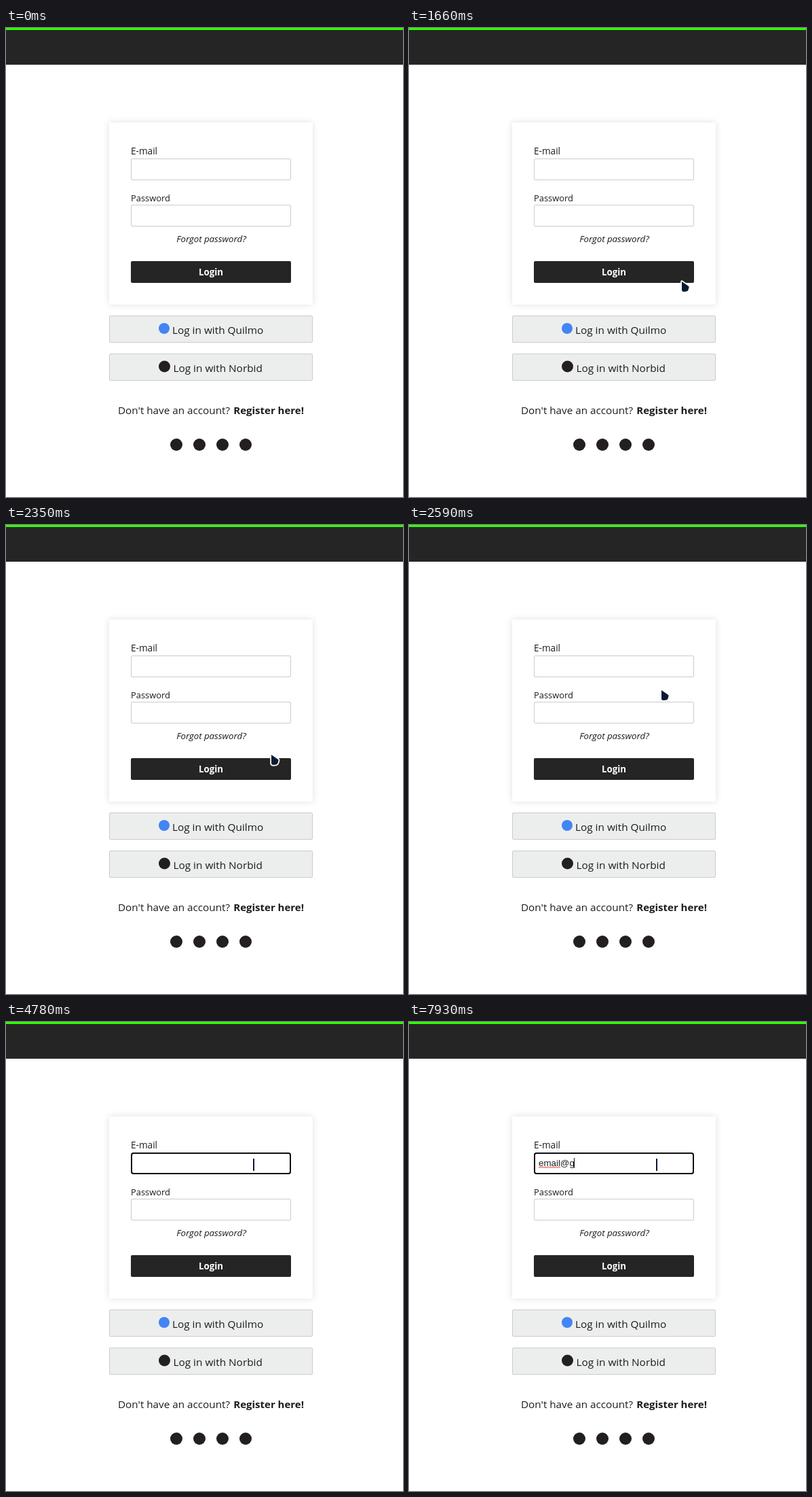
Recreate the animation shown at these times as an HTML page. Size 585 by 690 pixels, loop 8000 ms.

```html
<!DOCTYPE html>
<html lang="en">
<head>
<meta charset="utf-8">
<title>Login form</title>
<style>
html, body { margin: 0; width: 100%; height: 100%; overflow: hidden; background: #fff; }
svg { display: block; width: 585px; height: 690px; }
text { font-family: "Open Sans", "Noto Sans", sans-serif; fill: #1c1c1c; white-space: pre; }
#typed { font: 13.333px "Liberation Sans", Arial, sans-serif; }
.dark { fill: #252525; }
.field { fill: #fff; stroke: #ccc; }
.option { fill: #eceeee; stroke: #ccc; }
.icon { fill: #231f20; }
.card { filter: drop-shadow(0 0 5px rgba(0, 0, 0, .13)); }
</style>
</head>
<body>
<svg viewBox="0 0 585 690" xmlns="http://www.w3.org/2000/svg">
  <rect width="585" height="690" fill="#fff"/>
  <rect class="dark" width="585" height="54"/>
  <rect width="585" height="3" fill="#2bff00"/>

  <rect class="card" x="152" y="139" width="300" height="268" rx="2" fill="#fff"/>
  <text x="184" y="186" font-size="13.6">E-mail</text>
  <rect class="field" x="184.5" y="192.5" width="235" height="31" rx="1.5"/>
  <rect id="focus" x="185" y="193" width="234" height="30" rx="3" fill="#fff" stroke="#101010" stroke-width="2"/>
  <text id="typed" x="191" y="212"></text>
  <path id="squiggle" fill="none" stroke="#e0362c"/>
  <rect id="caret" y="200" width="1" height="15" fill="#111"/>

  <text x="184" y="255" font-size="12.9">Password</text>
  <rect class="field" x="184.5" y="260.5" width="235" height="31" rx="1.5"/>
  <text x="302.5" y="315" font-size="13.3" font-style="italic" text-anchor="middle">Forgot password?</text>
  <rect class="dark" x="184" y="343" width="236" height="32" rx="2"/>
  <text x="302" y="364" font-size="13.3" font-weight="700" text-anchor="middle" style="fill:#fff">Login</text>

  <rect class="option" x="152.5" y="423.5" width="299" height="39" rx="1.5"/>
  <circle cx="233" cy="442" r="8" fill="#4285f4"/>
  <text x="245" y="450" font-size="15.35">Log in with Quilmo</text>
  <rect class="option" x="152.5" y="479.5" width="299" height="39" rx="1.5"/>
  <circle class="icon" cx="233.5" cy="498" r="8.5"/>
  <text x="246.5" y="506" font-size="15.35">Log in with Norbid</text>

  <text x="165" y="568" font-size="15.25">Don't have an account?</text>
  <text x="439" y="568" font-size="15" font-weight="700" text-anchor="end">Register here!</text>
  <g id="social"></g>

  <path id="arrow" fill="#0b1a33" stroke="#fff" stroke-width="3.5" stroke-linejoin="round" paint-order="stroke"
    d="M1 1L1 13.5Q1.2 16 4 16L8 15.6Q10 15.2 10.6 13L11.6 9.6Q11.8 8 10 7.2Z"/>
  <rect id="beam" width="2" height="18" fill="#0b1a33"/>
  <circle id="click" cx="365" cy="210" r="12" fill="#52ff00" opacity=".7"/>
</svg>
<script>
const LOOP = 8000;
const FOCUS = 3130, CLICK_END = 3360, SPELLCHECK = 7320;
const $ = id => document.getElementById(id);
const show = (id, on) => $(id).setAttribute("visibility", on ? "visible" : "hidden");

// Pointer stops: time, x, y
const stops = [
  [1210, 577, 430], [1450, 462, 430], [1560, 423, 405], [1660, 402, 373], [1870, 397, 362],
  [2260, 397, 362], [2350, 391, 338], [2520, 376, 265], [2700, 365, 210]
];
// Typed length and caret position from each time on
const strokes = [
  [0, 0, 191], [5650, 1, 198], [5810, 2, 209], [5990, 3, 216],
  [6160, 4, 219], [6260, 5, 222], [7530, 6, 236], [7930, 7, 243]
];
const caretOff = [[3710, 4220], [4780, 5290], [6800, 7290]];

function pointerAt(t) {
  const next = stops.findIndex(s => s[0] > t);
  if (next < 0) return stops[stops.length - 1].slice(1);
  if (next === 0) return null;
  const [t0, x0, y0] = stops[next - 1], [t1, x1, y1] = stops[next];
  const k = (t - t0) / (t1 - t0);
  return [x0 + (x1 - x0) * k, y0 + (y1 - y0) * k];
}

function render(t) {
  const focused = t >= FOCUS;
  const [, length, caretX] = strokes.filter(s => s[0] <= t).pop();
  show("focus", focused);
  $("typed").textContent = "email@g".slice(0, length);
  $("caret").setAttribute("x", caretX);
  show("caret", focused && !caretOff.some(([a, b]) => t >= a && t < b));
  show("squiggle", t >= SPELLCHECK);

  const pos = pointerAt(t);
  const overField = pos && pos[1] < 224;
  show("arrow", pos && !overField);
  show("beam", overField);
  if (pos) {
    const [x, y] = pos.map(Math.round);
    $("arrow").setAttribute("transform", `translate(${x - 1} ${y - 1})`);
    $("beam").setAttribute("x", x - 1);
    $("beam").setAttribute("y", y - 9);
  }
  show("click", focused && t < CLICK_END);
}

$("social").innerHTML = [0, 1, 2, 3]
  .map(i => `<circle class="icon" cx="${251 + 34 * i}" cy="613" r="9"/>`).join("");
$("squiggle").setAttribute("d", "M191 214.5" + "l2 -1.5l2 1.5".repeat(8));

const start = performance.now();
function tick() {
  render((performance.now() - start) % LOOP);
  requestAnimationFrame(tick);
}
tick();
</script>
</body>
</html>
```
